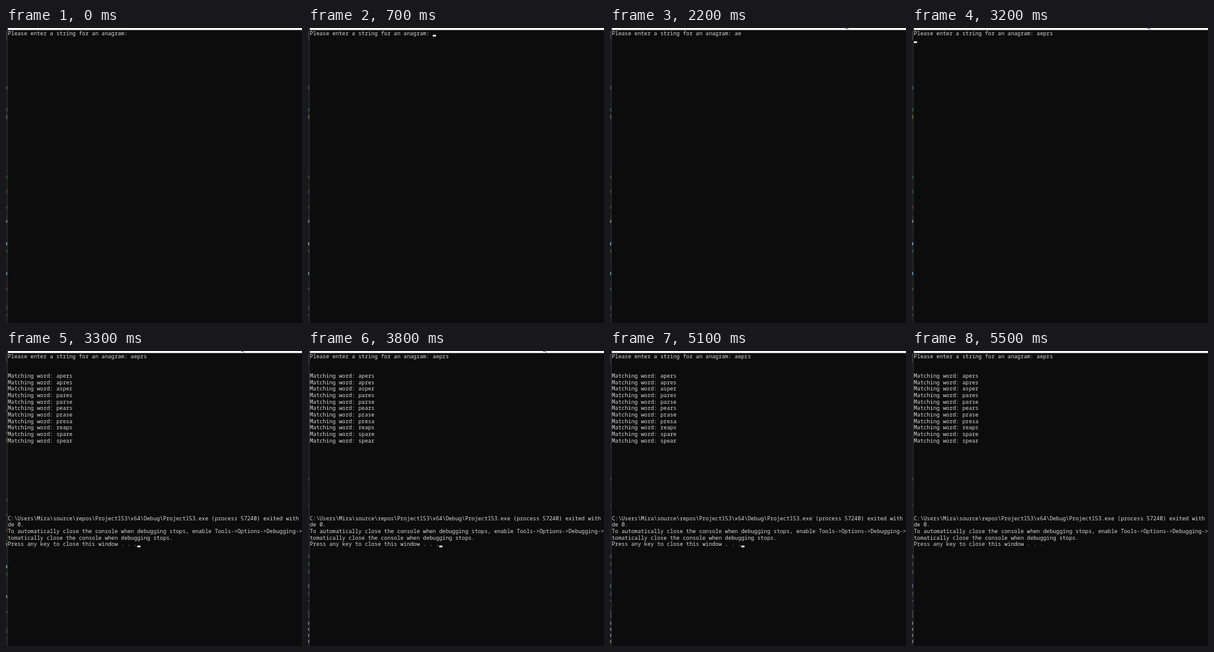
An HTML page with a canvas for the animation above (5600 ms loop, 488 px wide and 486 px high).

```html
<!DOCTYPE html>
<html lang="en">
<head>
<meta charset="utf-8">
<title>Anagram console</title>
<style>
  html, body { margin: 0; width: 100%; height: 100%; overflow: hidden; background: #0c0c0c; }
  canvas { display: block; }
</style>
</head>
<body>
<canvas id="stage" width="488" height="486"></canvas>
<script>
const ctx = document.getElementById('stage').getContext('2d');
const LOOP = 5600;
const SCALE = 2 / 3, CELL_W = 8, CELL_H = 16;
const LEFT = 3, TOP = 10 / 3;
const PROMPT = 'Please enter a string for an anagram: ';
const KEYS = { a: 1700, e: 1800, p: 2500, r: 2600, s: 2700 };
const ENTER = 3200, RESULT = 3300, EDITOR_CHANGE = 3500;
const WORDS = 'apers apres asper pares parse pears prase presa reaps spare spear'.split(' ');
const REPORT = [
  'C:\\Users\\Mira\\source\\repos\\Project153\\x64\\Debug\\Project153.exe (process 57240) exited with',
  'de 0.',
  'To automatically close the console when debugging stops, enable Tools->Options->Debugging->',
  'tomatically close the console when debugging stops.',
  'Press any key to close this window . . .'
];
const CURSOR_ON = [[600, 1100], [1700, 2200], [2500, 2700], [3200, 3400], [3800, 4300], [4900, 5400]];

// Code showing at the left of the window: y, height, colour
const EDITOR_BEFORE = [
  [5, 14, '#333'], [96, 5, '#2c5068'], [132, 5, '#2a5045'], [143, 7, '#3a5a2c'],
  [243, 5, '#24502c'], [267, 5, '#24502c'], [293, 5, '#5a2e26'], [312, 1, '#555'],
  [316, 5, '#77734f'], [353, 5, '#5a88a4'], [365, 5, '#294f2d'], [378, 1, '#5a2e26'],
  [402, 5, '#537c94'], [428, 4, '#264f48'], [457, 8, '#38383c'], [472, 2, '#46466e']
];
const EDITOR_AFTER = [
  [5, 14, '#333'], [209, 4, '#383838'], [253, 2, '#383838'], [336, 5, '#2f4d60'],
  [348, 5, '#2d4c32'], [361, 5, '#444'], [384, 6, '#3e4d78'], [396, 7, '#3a3a3e'],
  [410, 2, '#46466e'], [427, 13, '#38383c'], [446, 5, '#6b6566'], [456, 5, '#6b6566'],
  [466, 5, '#6b6566'], [476, 5, '#6b6566']
];

function rect(x, y, w, h, color) {
  ctx.fillStyle = color;
  ctx.fillRect(x, y, w, h);
}

function print(text, row) {
  ctx.fillText(text, 0, row * CELL_H + 13.2);
}

function drawBackdrop(t) {
  rect(0, 0, 488, 486, '#0c0c0c');
  rect(0, 0, 2, 486, '#1c1c1d');
  rect(2, 0, 1, 486, '#2c2c2d');
  for (const [y, h, color] of t < EDITOR_CHANGE ? EDITOR_BEFORE : EDITOR_AFTER) rect(0, y, 2, h, color);
  rect(LEFT, 0, 485, TOP, '#fff');
}

// Only the tail of the mouse pointer reaches into view
function drawPointer(t) {
  if (t < 1000 || t >= 4000) return;
  const settled = t >= 1500;
  const x = settled ? 390 : 392;
  ctx.strokeStyle = settled ? '#222' : '#999';
  ctx.lineWidth = 1;
  ctx.beginPath();
  ctx.moveTo(x - 2, 0.5);
  ctx.lineTo(x, 0.5);
  if (settled) {
    ctx.moveTo(x + 1, 0);
    ctx.lineTo(x + 2.5, 2.5);
  }
  ctx.stroke();
}

function drawConsole(t) {
  const typed = Object.keys(KEYS).filter(key => t >= KEYS[key]).join('');
  let row = 0, col = PROMPT.length + typed.length;
  ctx.save();
  ctx.translate(LEFT, TOP);
  ctx.scale(SCALE, SCALE);
  ctx.font = '13.3333px "Noto Sans Mono", monospace';
  ctx.fillStyle = '#d8d8d8';
  print(PROMPT + typed, 0);
  if (t >= ENTER) [row, col] = [1, 0];
  if (t >= RESULT) {
    WORDS.forEach((word, i) => print('Matching word: ' + word, 3 + i));
    REPORT.forEach((line, i) => print(line, 25 + i));
    [row, col] = [29, REPORT[4].length];
  }
  if (CURSOR_ON.some(([from, to]) => t >= from && t < to)) {
    rect(col * CELL_W, row * CELL_H + 12, CELL_W, 4, '#fff');
  }
  ctx.restore();
}

function frame() {
  const t = performance.now() % LOOP;
  drawBackdrop(t);
  drawPointer(t);
  drawConsole(t);
  requestAnimationFrame(frame);
}
frame();
</script>
</body>
</html>
```
